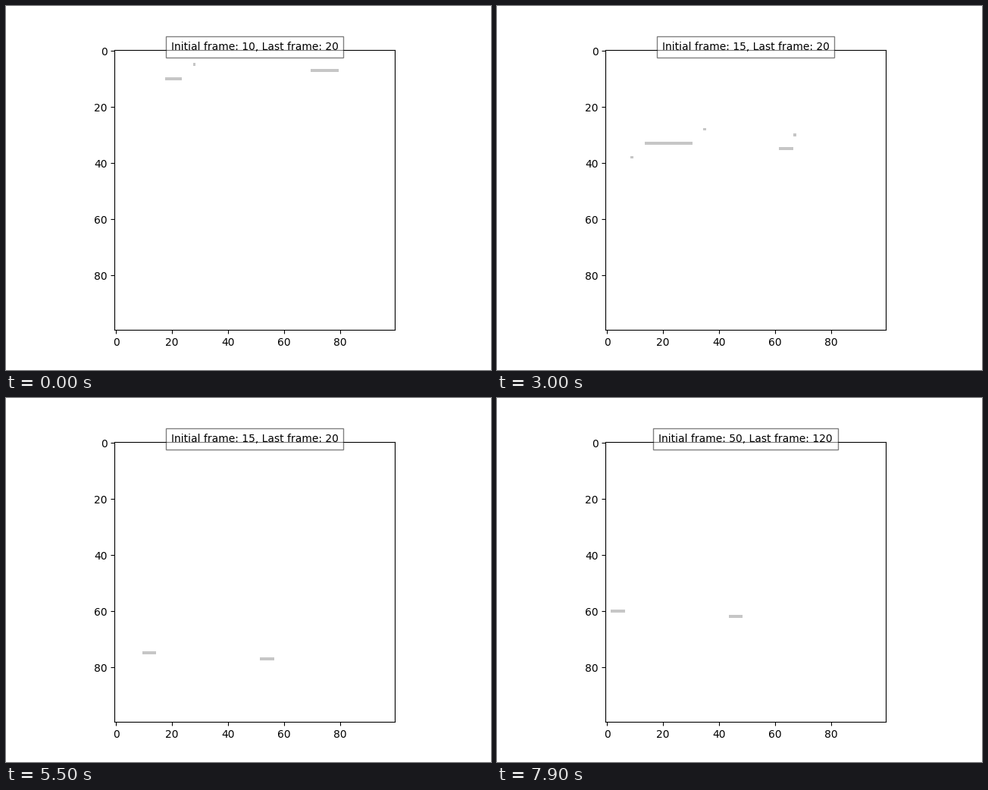
Animation, 640 px wide and 480 px high, one loop 8000 ms. Source, as a matplotlib script:

```python
import numpy as np
import matplotlib.pyplot as plt
from matplotlib.animation import FuncAnimation

STEPS, SIZE, GRAY = 80, 100, 0.775

# Each sweep of the front: start step, (row, rows per step), (column, columns per step)
SWEEPS = [
    (0, (10, 5.72), (21, 1.1)),
    (16, (9.6, 1.685), (29, -0.42)),
    (64, (9.2, 3.4), (22.5, -1.2)),
]

# Step from which a caption holds: (initial, last)
CAPTIONS = {
    0: (10, 20), 1: (20, 20), 17: (20, 180), 27: (15, 20),
    45: (20, 185), 55: (15, 20), 73: (50, 120),
}


def current(starts, step):
    return max(s for s in starts if s <= step)


def bars(step):
    """Pieces of the slanted front as (row, first column, length)."""
    rng = np.random.default_rng(step)
    start, (row, fall), (col, drift) = [s for s in SWEEPS if s[0] <= step][-1]
    age = step - start
    row = int(row + fall * age)
    col += drift * age

    # The front is widest early in the second sweep
    width = round(5 + 15 * np.exp(-((step - 24) / 14) ** 2))
    left = int(col - width / 2)
    yield row, left, width
    if width > 5:
        yield row - 5, left + width + 4, 1
    if width > 12:
        yield row + 5, left - 5, int(rng.integers(1, 5))

    # The right half sits higher while the front drifts to the right
    dy, dx, width2 = (-3, 54, 10) if drift > 0 else (2, 42, 5)
    right = int(col + dx - width2 / 2)
    yield row + dy, right, width2
    if width > 6:
        yield row + dy - 5, right + width2, int(rng.integers(1, 4))


def field(step):
    img = np.ones((SIZE, SIZE))
    for row, first, length in bars(step):
        if 0 <= row < SIZE:
            img[row, max(first, 0):max(first + length, 0)] = GRAY
    return img


def caption(step):
    first, last = CAPTIONS[current(CAPTIONS, step)]
    return f"Initial frame: {first}, Last frame: {last}"


fig, ax = plt.subplots(figsize=(6.4, 4.8), dpi=100)
image = ax.imshow(field(0), cmap="gray", vmin=0, vmax=1)
title = ax.text(0.5, 1.0, caption(0), transform=ax.transAxes, ha="center",
                bbox={"facecolor": "w", "alpha": 0.5, "pad": 5})


def update(step):
    image.set_data(field(step))
    title.set_text(caption(step))
    return image, title


anim = FuncAnimation(fig, update, frames=STEPS, interval=100, repeat=True,
                     repeat_delay=0, blit=False)
plt.show()
```
